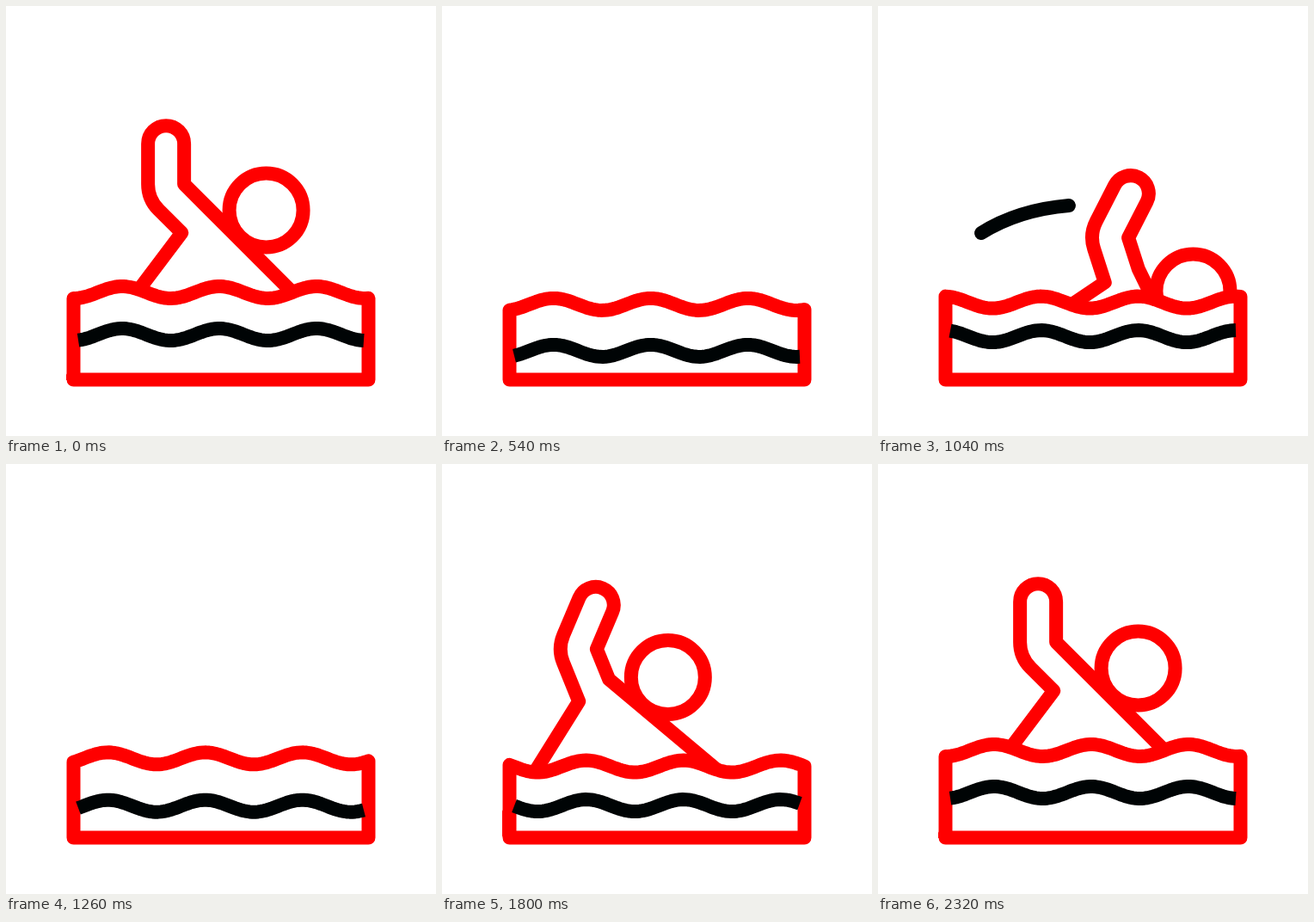
Write an HTML page that moves like this. It is 500 by 500 pixels and loops after 2.5 s.

```html
<!DOCTYPE html>
<html lang="en">
<head>
<meta charset="utf-8">
<title>Swimmer</title>
<style>
  html, body { margin: 0; width: 100%; height: 100%; overflow: hidden; background: #fff; }
  svg { display: block; width: 100vw; height: 100vh; }
  path, circle { fill: none; stroke: #f00; stroke-width: 16; stroke-linejoin: round; }
  #water { fill: #fff; }
  #ripple, #swoosh { stroke: #000405; }
  #swoosh { stroke-linecap: round; }
</style>
</head>
<body>
<svg viewBox="0 0 500 500">
  <clipPath id="pool"><rect x="70" y="0" width="360" height="435"/></clipPath>
  <path id="swoosh" d="M120 264Q163 237 222 232" pathLength="100"/>
  <g id="swimmer" clip-path="url(#pool)">
    <path id="body"/>
    <circle id="head" r="43"/>
  </g>
  <path id="water"/>
  <path id="ripple"/>
</svg>
<script>
const LOOP = 2500, START = 180, END = 2320;
const el = id => document.getElementById(id);
const rad = deg => deg * Math.PI / 180;

// Smooth curve through [time, value...] keys, at rest at both ends.
function spline(keys, t) {
  const last = keys.length - 1;
  t = Math.min(Math.max(t, keys[0][0]), keys[last][0]);
  let i = 0;
  while (i < last - 1 && t >= keys[i + 1][0]) i++;
  const a = keys[i], b = keys[i + 1], span = b[0] - a[0], u = (t - a[0]) / span;
  const slope = (k, j) => k === 0 || k === last ? 0 :
    (keys[k + 1][j] - keys[k - 1][j]) / (keys[k + 1][0] - keys[k - 1][0]);
  return a.slice(1).map((v, n) => {
    const j = n + 1, w = 1 - u;
    return v * (1 + 2 * u) * w * w + b[j] * u * u * (3 - 2 * u) +
      span * u * w * (slope(i, j) * w - slope(i + 1, j) * u);
  });
}

const surfaceKeys = [[180, 333], [440, 354], [540, 347], [740, 327], [815, 323],
  [1040, 344.5], [1150, 352], [1500, 322], [1800, 351.5], [1870, 354], [2320, 333]];
const rippleKeys = [[180, 382], [480, 404], [540, 401], [740, 382.5], [860, 373],
  [1040, 384], [1190, 402], [1500, 375], [1800, 397], [1900, 403], [2320, 382]];
const driftKeys = [[0, 59], [180, 0], [540, -118], [740, -181], [1040, -284],
  [1500, -432], [1800, -532], [2320, -678], [2500, -700]];

// Keys per stroke: time, shoulder x, shoulder y, body lean, arm angle.
const strokes = [
  [[180, 234, 234, 45, 0], [360, 288, 290, 30, 20], [530, 340, 490, 15, 55]],
  [[540, 150, 480, 35, 50], [740, 214, 269, 40, 37], [850, 243, 239, 45, 7],
   [1040, 302.5, 305, 26, 27], [1220, 345, 490, 15, 55]],
  [[1540, 135, 480, 40, 55], [1800, 194, 251, 50, 23], [1960, 216, 238, 48, 8],
   [2320, 234, 234, 45, 0]]
];
const swooshKeys = [[0, 0, 0], [130, 0, 100], [150, 0, 100], [270, 100, 100]];

const ARM = 42, UPPER = 38, FOREARM = 47;

// Moves from p along a lean (degrees clockwise from up) and to its right.
function move([x, y], lean, ahead, right = 0) {
  const s = Math.sin(rad(lean)), c = Math.cos(rad(lean));
  return [x + s * ahead + c * right, y - c * ahead + s * right];
}
const pt = p => p.map(v => v.toFixed(2)).join(' ');

function drawSwimmer(t) {
  const stroke = strokes.findLast(keys => t >= keys[0][0]);
  const [x, y, lean, arm] = spline(stroke, t);
  const upper = arm - 45;
  const shoulder = [x, y];
  const elbow = move(shoulder, upper, UPPER);
  const hand = move(elbow, arm, FOREARM);
  const miter = ARM * Math.tan(rad((upper + lean) / 2));
  const armpit = move(shoulder, upper, -miter, -ARM);
  const arc = (r, p) => `A${r} ${r} 0 0 `;
  el('body').setAttribute('d',
    `M${pt(move(shoulder, -lean, -260))}L${pt(shoulder)}L${pt(elbow)}L${pt(hand)}` +
    `A21 21 0 0 0 ${pt(move(hand, arm, 0, -ARM))}L${pt(move(elbow, arm, 0, -ARM))}` +
    `A42 42 0 0 0 ${pt(move(elbow, upper, 0, -ARM))}L${pt(armpit)}` +
    `L${pt(move(armpit, 82 - lean, -260))}`);
  const [hx, hy] = move(shoulder, -lean, -51, 46);
  el('head').setAttribute('cx', hx);
  el('head').setAttribute('cy', hy);
}

function wave(left, right, level, drift) {
  const points = [];
  for (let i = 0; i <= 100; i++) {
    const x = left + (right - left) * i / 100;
    points.push(pt([x, level - 7 * Math.cos(2 * Math.PI * (x - 135 - drift) / 113)]));
  }
  return 'M' + points.join('L');
}

function drawWater(t) {
  const [drift] = spline(driftKeys, t);
  const [surface] = spline(surfaceKeys, t);
  const [ripple] = spline(rippleKeys, t);
  el('water').setAttribute('d', wave(78.5, 421.5, surface, drift) + 'V434.5H78.5Z');
  el('ripple').setAttribute('d', wave(84, 416, ripple, drift));
}

function drawSwoosh(t) {
  const start = t < 540 ? 250 : 900;
  const [tail, tip] = spline(swooshKeys, t - start);
  const swoosh = el('swoosh');
  swoosh.style.display = tip - tail > 0.5 ? '' : 'none';
  swoosh.setAttribute('stroke-dasharray', `${tip - tail} 300`);
  swoosh.setAttribute('stroke-dashoffset', -tail);
}

function draw(time) {
  const t = Math.min(Math.max(time % LOOP, START), END);
  drawSwimmer(t);
  drawWater(t);
  drawSwoosh(t);
}

const origin = performance.now();
function tick() {
  draw(performance.now() - origin);
  requestAnimationFrame(tick);
}
draw(0);
requestAnimationFrame(tick);
</script>
</body>
</html>
```
